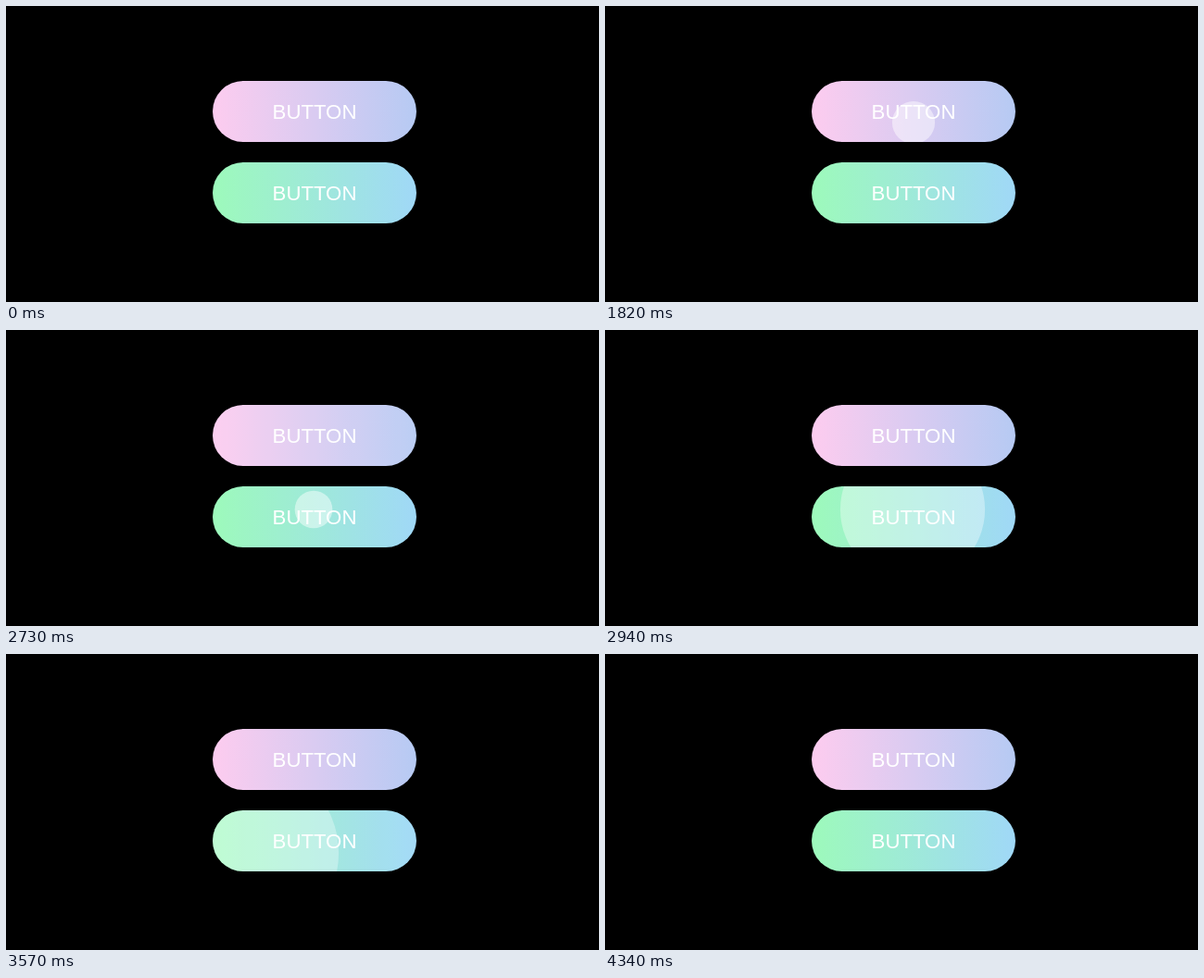
An HTML page for the animation above (4.41 s loop, 640x320 px).

```html
<!DOCTYPE html>
<html lang="en">
<head>
<meta charset="utf-8">
<title>Ripple buttons</title>
<style>
  html, body { margin: 0; width: 100%; height: 100%; overflow: hidden; background: #000; }
  svg { display: block; width: 100%; height: 100%; }
  text { font: 22.2px "Liberation Sans", Arial, sans-serif; fill: #fff; text-anchor: middle; }
</style>
</head>
<body>
<svg viewBox="0 0 640 320">
  <defs>
    <linearGradient id="pink">
      <stop offset="0" stop-color="#fdccef"/>
      <stop offset="1" stop-color="#b6caf3"/>
    </linearGradient>
    <linearGradient id="green">
      <stop offset="0" stop-color="#9dfabb"/>
      <stop offset="1" stop-color="#a0d8f7"/>
    </linearGradient>
    <clipPath id="pinkClip"><rect x="223" y="81" width="220" height="66" rx="33"/></clipPath>
    <clipPath id="greenClip"><rect x="223" y="169" width="220" height="66" rx="33"/></clipPath>
  </defs>
  <rect x="223" y="81" width="220" height="66" rx="33" fill="url(#pink)"/>
  <rect x="223" y="169" width="220" height="66" rx="33" fill="url(#green)"/>
  <text x="333" y="122">BUTTON</text>
  <text x="333" y="210">BUTTON</text>
  <g id="pinkRipples" clip-path="url(#pinkClip)" fill="#fff"></g>
  <g id="greenRipples" clip-path="url(#greenClip)" fill="#fff"></g>
</svg>
<script>
  const LOOP = 4410, STEP = 70;
  const LIFE = 1000, MAX_RADIUS = 275, START_OPACITY = 0.5;
  const MIN_AGE = 20; // a ripple appears once it is large enough to see

  const clicks = [
    { layer: "pinkRipples", at: 1736, x: 333, y: 126 },
    { layer: "pinkRipples", at: 1867, x: 333, y: 126 },
    { layer: "greenRipples", at: 2656, x: 332, y: 194 },
    { layer: "greenRipples", at: 3206, x: 259, y: 215 }
  ];

  for (const click of clicks) {
    const circle = document.createElementNS("http://www.w3.org/2000/svg", "circle");
    circle.setAttribute("cx", click.x);
    circle.setAttribute("cy", click.y);
    document.getElementById(click.layer).append(circle);
    click.circle = circle;
  }

  function render(time) {
    for (const { at, circle } of clicks) {
      const age = time - at;
      const p = age > MIN_AGE && age < LIFE ? age / LIFE : 0;
      circle.setAttribute("r", p * MAX_RADIUS);
      circle.setAttribute("opacity", START_OPACITY * (1 - p));
    }
  }

  const start = performance.now();
  function tick() {
    const time = (performance.now() - start) % LOOP;
    render(Math.floor(time / STEP) * STEP);
    requestAnimationFrame(tick);
  }
  tick();
</script>
</body>
</html>
```
